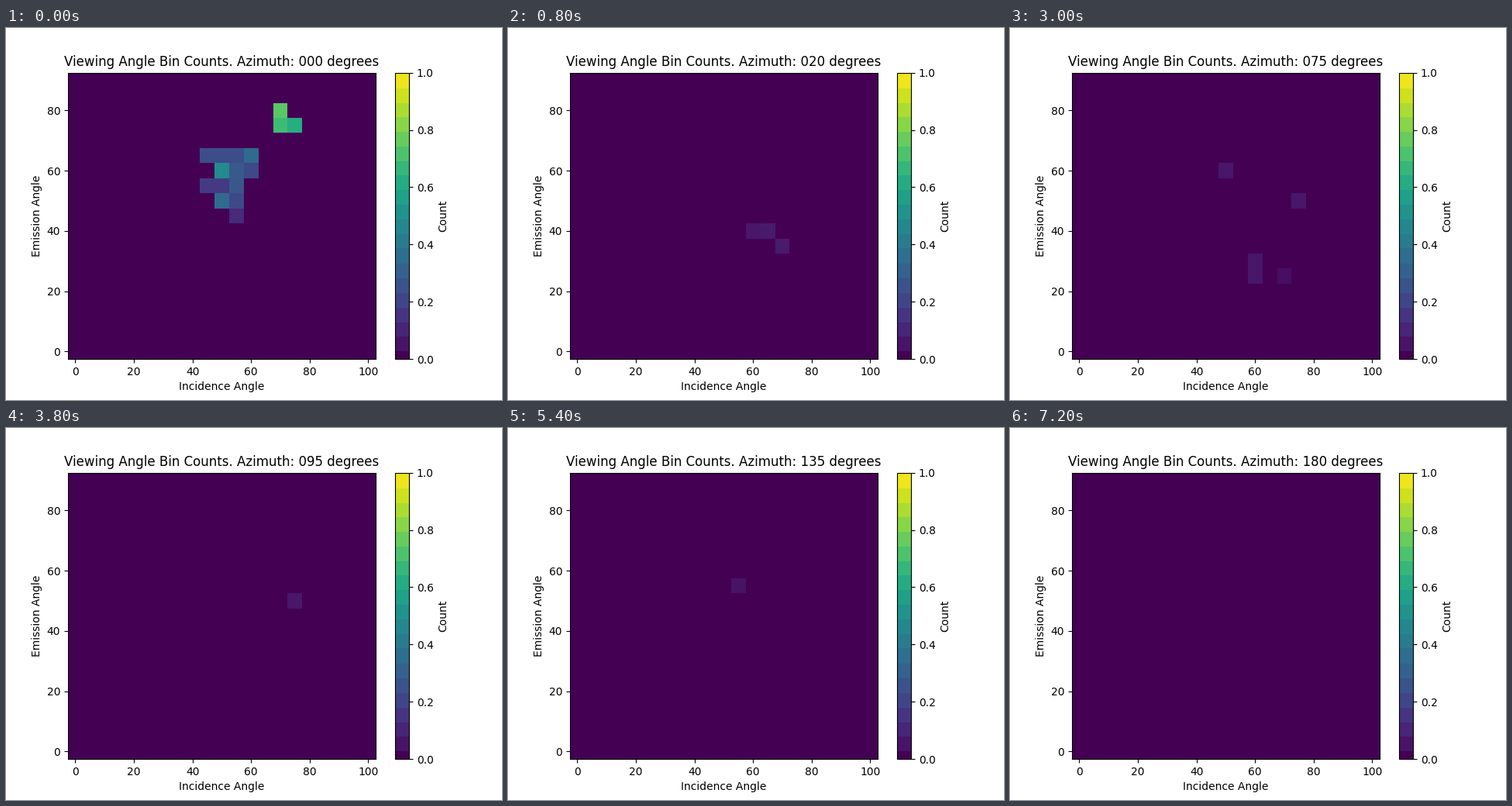
A matplotlib script for the animation above (7400 ms loop, 640x480 px).

```python
import numpy as np
import matplotlib.pyplot as plt
from matplotlib.animation import FuncAnimation
from matplotlib.cm import ScalarMappable
from matplotlib.colors import ListedColormap, Normalize

STEP = 5            # bin size and azimuth step, degrees
FRAMES = 37
INTERVAL = 200
BANDS = 19.5        # colour steps along the bar

x_edges = np.arange(-2.5, 103, STEP)
y_edges = np.arange(-2.5, 93, STEP)
inc, emi = np.meshgrid(np.arange(0, 101, STEP), np.arange(0, 91, STEP))

# Faint sightings: incidence column, key azimuths, emission at each of them,
# first and last count
TRACKS = [
    (60, [5, 20, 40, 75, 85], [50, 40, 25, 27.5, 27.5], 0.06, 0.06),
    (65, [5, 20, 30, 55], [50, 40, 22.5, 22.5], 0.09, 0.02),
    (70, [5, 20, 40, 85], [45, 35, 25, 25], 0.08, 0.03),
    (50, [35, 45, 60, 85], [62.5, 62.5, 60, 60], 0.18, 0.03),
    (75, [65, 95], [50, 50], 0.06, 0.06),
    (55, [130, 135], [55, 55], 0.05, 0.05),
    (50, [160, 165], [75, 75], 0.05, 0.05),
]


def first_counts():
    """Two bright patches: a small triangle and a ragged wedge."""
    triangle = (inc >= 70) & (emi >= 75) & (inc + emi <= 150)
    left = np.maximum(100 - emi, 50 - emi % 10)
    wedge = (inc >= left) & (inc <= 40 + emi / 3) & (emi <= 65)

    slope = 0.74 - 0.01 * (80 - emi) - 0.014 * (inc - 70)
    dome = 0.28 - 0.00095 * (emi - 58) ** 2
    body = np.select(
        [inc == 60, (inc == 50) & (emi % 10 == 0), inc < 55],
        [0.22 + 0.024 * (emi - 60),
         0.34 + 0.014 * (emi - 50),
         dome - 0.01 * (65 - emi)],
        dome)
    return np.select([triangle, wedge], [slope, body], 0.0)


def counts(azimuth):
    if azimuth == 0:
        return first_counts()
    grid = np.zeros(inc.shape)
    for column, times, path, start, end in TRACKS:
        if times[0] <= azimuth <= times[-1]:
            row = np.interp(azimuth, times, path)
            count = np.interp(azimuth, [times[0], times[-1]], [start, end])
            grid[(inc == column) & (abs(emi - row) <= STEP / 2)] = count
    return grid


def stepped_viridis():
    levels = np.linspace(0, 1, 256)
    return ListedColormap(plt.get_cmap("viridis")(
        np.floor(levels * BANDS + 0.5).clip(0, 19) / BANDS))


plt.rcParams["font.family"] = "DejaVu Sans"
fig, ax = plt.subplots(figsize=(6.4, 4.8), dpi=100)
mesh = ax.pcolormesh(x_edges, y_edges, counts(0), cmap="viridis",
                     vmin=0, vmax=1)
ax.set_xlabel("Incidence Angle")
ax.set_ylabel("Emission Angle")
title = ax.set_title("")
fig.colorbar(ScalarMappable(Normalize(0, 1), stepped_viridis()), ax=ax,
             label="Count")


def update(i):
    azimuth = i * STEP
    mesh.set_array(counts(azimuth))
    title.set_text(f"Viewing Angle Bin Counts. Azimuth: {azimuth:03d} degrees")
    return mesh, title


anim = FuncAnimation(fig, update, frames=FRAMES, interval=INTERVAL,
                     repeat=True, repeat_delay=0, blit=False)
plt.show()
```
